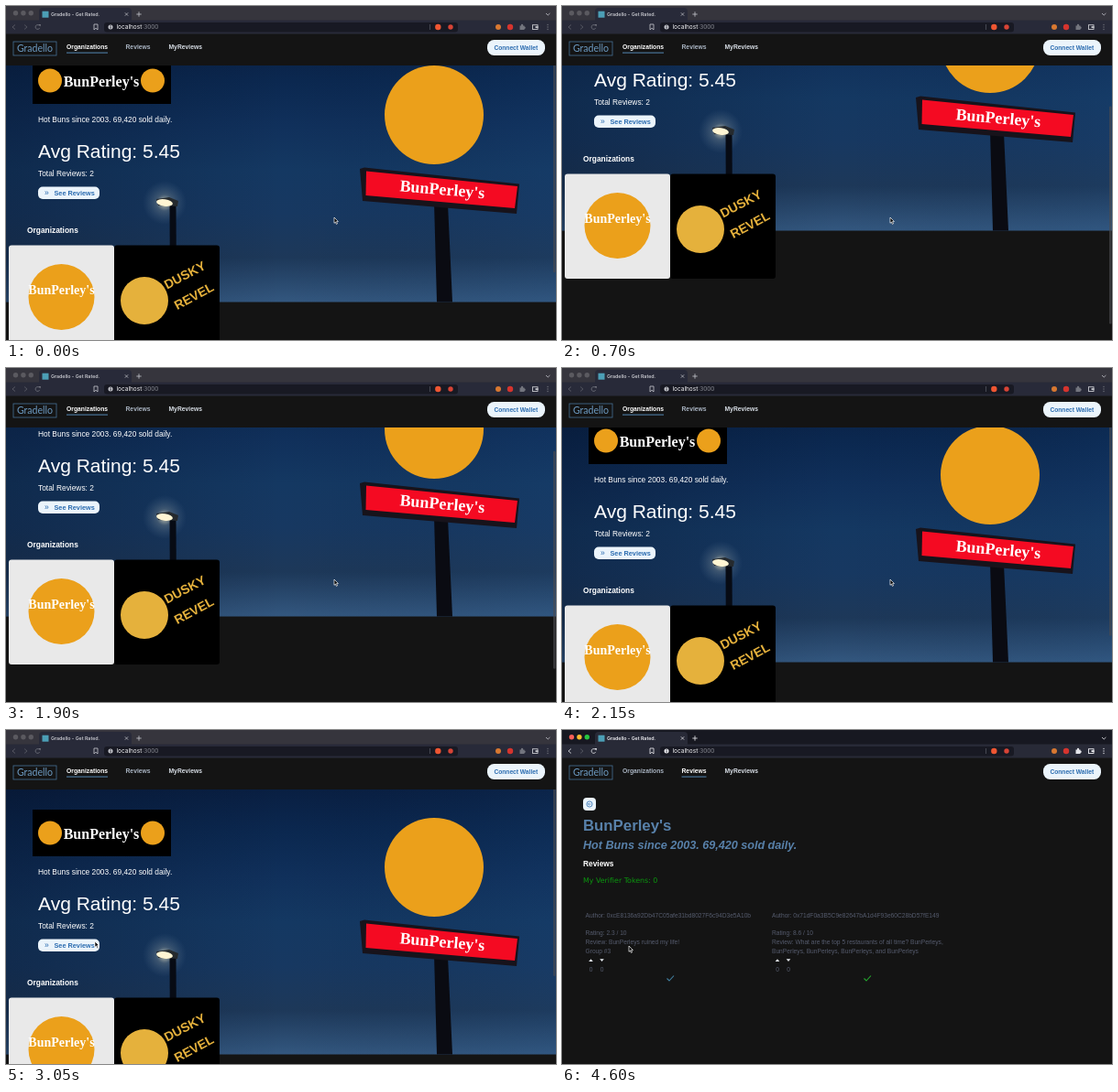
Animation of 600 by 365 pixels, one loop 5 s. Source, as an HTML page with a canvas:

```html
<!DOCTYPE html>
<html lang="en">
<head>
<meta charset="utf-8">
<title>Gradello - Get Rated.</title>
<style>
html, body { margin: 0; width: 100%; height: 100%; overflow: hidden; background: #141414; }
canvas { display: block; width: 600px; height: 365px; }
</style>
</head>
<body>
<canvas id="stage"></canvas>
<script>
const W = 600, H = 365, LOOP = 5000, STEP = 50;
const MAX_SCROLL = 124, ACTIVATE = 3600, NAVIGATE = 4300;
const SANS = '"Liberation Sans", Arial, sans-serif';
const SERIF = '"Liberation Serif", serif';
const UI = 'Inter, sans-serif';
const PAGE = '#141414', PALE = '#ebf4fb', LINK = '#2b6cb0', STEEL = '#5881aa', MUTED = '#555b6d';
const ORANGE = '#eba01b', GOLD = '#e5b13c';
const BRAND = "BunPerley's", MOTTO = 'Hot Buns since 2003. 69,420 sold daily.';

const canvas = document.getElementById('stage');
const c = canvas.getContext('2d');
const dpr = window.devicePixelRatio || 1;
canvas.width = W * dpr;
canvas.height = H * dpr;

const scrollKeys = [[0, 31], [150, 58], [350, 87], [700, 109], [1000, 121], [1300, 125.5], [1500, 125.5],
  [1700, 119], [1900, 83], [2150, 33], [2350, 10], [2550, 0]];
const cursorX = [[2550, 358], [2750, 260], [2900, 145], [3050, 97], [3350, 78], [3600, 76], [4300, 76], [4450, 73]];
const cursorY = [[2550, 231], [3050, 231], [3500, 235], [3600, 236]];

function track(keys, t) {
  if (t <= keys[0][0]) return keys[0][1];
  for (let i = 1; i < keys.length; i++) {
    const [t0, a] = keys[i - 1], [t1, b] = keys[i];
    if (t <= t1) return a + (b - a) * (t - t0) / (t1 - t0);
  }
  return keys[keys.length - 1][1];
}

// y is the middle of the capitals
function text(str, x, y, size, color, style = '', family = SANS, align = 'left') {
  c.font = `${style} ${size}px ${family}`;
  c.fillStyle = color;
  c.textAlign = align;
  c.fillText(str, x, y + size * 0.35);
}
function rect(x, y, w, h, color) {
  c.fillStyle = color;
  c.fillRect(x, y, w, h);
}
function round(x, y, w, h, r, color) {
  c.beginPath();
  c.roundRect(x, y, w, h, r);
  c.fillStyle = color;
  c.fill();
}
function disc(x, y, r, color) {
  c.beginPath();
  c.arc(x, y, r, 0, Math.PI * 2);
  c.fillStyle = color;
  c.fill();
}
function trace(points) {
  c.beginPath();
  for (let i = 0; i < points.length; i += 2) c.lineTo(points[i], points[i + 1]);
}
function poly(points, color) {
  trace(points);
  c.closePath();
  c.fillStyle = color;
  c.fill();
}
function line(points, color, width = 0.8) {
  trace(points);
  c.strokeStyle = color;
  c.lineWidth = width;
  c.stroke();
}
function rotated(x, y, angle, draw) {
  c.save();
  c.translate(x, y);
  c.rotate(angle);
  draw();
  c.restore();
}
function gradient(x0, y0, x1, y1, ...colors) {
  const g = c.createLinearGradient(x0, y0, x1, y1);
  colors.forEach((color, i) => g.addColorStop(i / (colors.length - 1), color));
  return g;
}

function drawBrowser(active) {
  const bar = active ? '#282a37' : '#282a39';
  const icon = active ? '#e4e5ea' : '#73757e';
  const label = active ? '#eeeef2' : '#c6c7cd';
  rect(0, 0, W, 16, active ? '#171821' : '#36353d');
  rect(0, 15.5, W, 15, bar);
  round(36, 2, 101, 16, [4, 4, 0, 0], bar);
  const lights = active ? ['#ff5f57', '#febc2e', '#28c840'] : ['#5b5a60', '#5b5a60', '#5b5a60'];
  lights.forEach((color, i) => disc(10.5 + i * 8.4, 7.8, 2.7, color));
  rect(39.5, 5.7, 7, 7, '#4c9fb6');
  text('Gradello - Get Rated.', 49, 9, 5.3, label, '600', UI);
  line([129.8, 7.3, 133.2, 10.7], label, 0.7);
  line([133.2, 7.3, 129.8, 10.7], label, 0.7);
  line([142.3, 9, 147.7, 9], label, 0.8);
  line([145, 6.3, 145, 11.7], label, 0.8);
  line([589, 8, 591.2, 10, 593.4, 8], label, 0.8);

  line([10, 20.5, 7, 23, 10, 25.5], active ? icon : '#62646e', 0.8);
  line([20, 20.5, 23, 23, 20, 25.5], '#5b5d68', 0.8);
  c.beginPath();
  c.arc(34.5, 23, 2.4, 0.4, 5.4);
  c.strokeStyle = icon;
  c.lineWidth = 0.8;
  c.stroke();
  poly([35.2, 20, 38, 20, 37.4, 22.6], icon);
  line([96, 20, 100, 20, 100, 26, 98, 24.2, 96, 26, 96, 20], label, 0.8);

  round(107, 18, 386, 10.5, 3, '#181923');
  disc(114, 23, 2.5, label);
  rect(113.6, 22.4, 0.9, 2.2, '#1c1d27');
  rect(113.6, 21, 0.9, 0.8, '#1c1d27');
  text('localhost', 120.5, 23, 6.5, '#f4f4f6', '', UI);
  c.font = `6.5px ${UI}`;
  text(':3000', 120.5 + c.measureText('localhost').width, 23, 6.5, '#85878f', '', UI);
  rect(462, 20, 0.6, 6, '#666873');
  disc(471.3, 23, 3.2, '#ef5632');
  disc(485, 23, 2.7, '#d84436');

  disc(537, 23, 3, '#d87831');
  disc(550, 23, 3.2, '#d5342e');
  rect(560.5, 21.5, 5, 4.5, icon);
  disc(563, 21, 1.2, icon);
  disc(565.5, 23.7, 1.2, icon);
  c.strokeStyle = label;
  c.lineWidth = 0.9;
  c.strokeRect(574.5, 20.7, 5.5, 4.8);
  rect(577.5, 22.2, 3, 1.8, label);
  [20.5, 23, 25.5].forEach(y => disc(591, y, 0.65, icon));
}

function drawHeader(onReviews, lift) {
  c.save();
  c.translate(0, -lift);
  rect(0, 30.5, W, 34.5, PAGE);
  c.strokeStyle = '#456f94';
  c.lineWidth = 0.8;
  c.strokeRect(8, 39, 47, 15);
  text('Gradello', 31.5, 46.5, 10.6, '#6d9cc4', '', 'Lato, sans-serif', 'center');
  text('Organizations', 66, 44.8, 6.75, onReviews ? '#a9b4c2' : '#fff', 'bold');
  text('Reviews', 130.5, 44.8, 6.75, onReviews ? '#fff' : '#a9b4c2', 'bold');
  text('MyReviews', 177.5, 44.8, 6.75, '#d8dee6', 'bold');
  if (onReviews) rect(130.5, 50.6, 27, 1, '#5387b4');
  else rect(66, 50.6, 45, 1, '#5387b4');
  round(525, 37, 63, 17, 7.5, PALE);
  text('Connect Wallet', 556.3, 45.3, 6.65, LINK, 'bold', SANS, 'center');
  c.restore();
}

function drawPhoto() {
  rect(0, 65, W, 289.5, gradient(0, 65, 0, 354,
    '#091f42', '#0b2850', '#10305b', '#143862', '#173861', '#1d3859', '#33577f'));
  rect(0, 65, W, 289.5, gradient(0, 0, W, 0, 'rgba(4,12,30,.3)', 'rgba(4,12,30,0)', 'rgba(30,80,135,.12)'));

  const glow = c.createRadialGradient(173, 246, 1, 173, 246, 24);
  glow.addColorStop(0, 'rgba(255,245,205,.75)');
  glow.addColorStop(0.35, 'rgba(190,195,185,.25)');
  glow.addColorStop(1, 'rgba(120,150,180,0)');
  disc(173, 246, 24, glow);
  poly([178.5, 249, 185.5, 247, 186, 354.5, 179, 354.5], '#070b14');
  poly([164, 242, 178, 240, 188, 244, 187, 250, 166, 249], '#252a2e');
  c.beginPath();
  c.ellipse(173, 246, 9, 3.8, 0.15, 0, Math.PI * 2);
  c.fillStyle = '#fff5d3';
  c.fill();

  poly([467, 245, 482, 248, 487, 354.5, 470, 354.5], '#0a0b12');
  disc(467, 150, 54, ORANGE);
  poly([386, 209, 391, 207.5, 560, 225.5, 557, 258, 389, 244], '#17131b');
  poly([393, 211.5, 558, 228, 555, 252, 392.5, 238], '#f40a22');
  rotated(476, 231, 0.085, () => text(BRAND, 0, 0, 18, '#fff', 'bold', SERIF, 'center'));
}

function drawCards() {
  round(3, 292.5, 115, 114.5, 3, '#e9e9e9');
  disc(60.5, 349, 36, ORANGE);
  text(BRAND, 60.5, 341, 14, '#fff', 'bold', SERIF, 'center');
  round(118, 292.5, 115, 114.5, 3, '#000');
  disc(151, 353, 26, GOLD);
  rotated(195, 325, -0.49, () => text('DUSKY', 0, 0, 14, GOLD, 'bold', SANS, 'center'));
  rotated(205, 348, -0.49, () => text('REVEL', 0, 0, 14, GOLD, 'bold', SANS, 'center'));
}

function drawHome(scroll, over) {
  c.save();
  c.beginPath();
  c.rect(0, 65 - over, W, H);
  c.clip();
  c.translate(0, -scroll);
  drawPhoto();
  rect(29, 87, 151, 51, '#000');
  disc(48, 112.5, 13, ORANGE);
  disc(160, 112.5, 13, ORANGE);
  text(BRAND, 104, 113, 16, '#fff', 'bold', SERIF, 'center');
  text(MOTTO, 35, 155, 8.37, '#fff');
  text('Avg Rating: 5.45', 35, 189.3, 21, '#fff');
  text('Total Reviews: 2', 35, 214.2, 8.37, '#fff');
  round(35, 228.5, 67, 13.5, 5, PALE);
  text('»', 42, 235, 8.5, LINK);
  text('See Reviews', 52.5, 235.7, 7.3, LINK, 'bold');
  text('Organizations', 23, 276.2, 8.4, '#fff', 'bold');
  drawCards();
  c.restore();

  round(597, 31 + Math.min(scroll, MAX_SCROLL) * 0.72, 2.5, 238, 1.2, 'rgba(75,75,80,.65)');
  if (over > 0) rect(0, H - over, W, over, '#fff');
}

function drawReview(x, author, rating, lines, checkX, checkColor) {
  text('Author: ' + author, x, 203, 6.65, MUTED);
  text(`Rating: ${rating} / 10`, x, 221.5, 6.65, MUTED);
  lines.forEach((str, i) => text(str, x, 231.5 + i * 10, 6.65, MUTED));
  const up = x + 6, down = x + 18;
  poly([up - 2.3, 253, up, 250.3, up + 2.3, 253], '#e8edf2');
  poly([down - 2.3, 250.3, down, 253, down + 2.3, 250.3], '#e8edf2');
  text('0', up, 261.5, 6.65, MUTED, '', SANS, 'center');
  text('0', down, 261.5, 6.65, MUTED, '', SANS, 'center');
  line([checkX - 3.5, 271.5, checkX - 1, 274, checkX + 4, 268.5], checkColor, 1.1);
}

function drawReviews() {
  round(23, 74, 14, 14, 4, PALE);
  c.beginPath();
  c.arc(30, 81, 3.1, 0, Math.PI * 2);
  c.strokeStyle = LINK;
  c.lineWidth = 0.8;
  c.stroke();
  line([31.7, 81, 28.4, 81], LINK, 0.7);
  line([29.8, 79.6, 28.4, 81, 29.8, 82.4], LINK, 0.7);
  text(BRAND, 23, 104, 16.8, STEEL, 'bold');
  text(MOTTO, 23, 125.5, 12.6, STEEL, 'italic bold');
  text('Reviews', 23, 146, 8.4, '#fff', 'bold');
  text('My Verifier Tokens: 0', 23, 164.5, 7.9, '#0b980f', '', '"DejaVu Sans", sans-serif');
  drawReview(25.5, '0xcE8136a92Db47C05afe31bd8027F6c94D3e5A10b', '2.3',
    ['Review: BunPerleys ruined my life!', 'Group #3'], 118, '#417f9f');
  drawReview(229, '0x71dF0a3B5C9e82647bA1d4F93e60C28bD57fE149', '8.6',
    ['Review: What are the top 5 restaurants of all time? BunPerleys,',
      'BunPerleys, BunPerleys, BunPerleys, and BunPerleys'], 333, '#25a72f');
}

function drawCursor(x, y, hand) {
  c.save();
  c.translate(x, y);
  if (hand) {
    trace([-0.8, 0, 0.6, 0, 0.8, 2.6, 3.4, 3.2, 3.6, 5, 2.8, 7.6, -0.8, 7.6, -3, 4.6, -2.2, 3.8, -0.9, 4.8]);
  } else {
    trace([0, 0, 0, 6.3, 1.4, 5, 2.4, 7.4, 3.5, 6.9, 2.5, 4.6, 4.4, 4.5]);
  }
  c.closePath();
  c.fillStyle = hand ? '#fff' : '#000';
  c.strokeStyle = hand ? '#111' : '#fff';
  c.lineWidth = 0.7;
  c.fill();
  c.stroke();
  c.restore();
}

function render(now) {
  const t = Math.floor((now % LOOP) / STEP) * STEP;
  const onReviews = t >= NAVIGATE;
  const scroll = track(scrollKeys, t);
  const over = onReviews ? 0 : Math.max(0, scroll - MAX_SCROLL);
  c.setTransform(dpr, 0, 0, dpr, 0, 0);
  rect(0, 0, W, H, PAGE);
  if (onReviews) drawReviews();
  else drawHome(scroll, over);
  drawHeader(onReviews, over);
  drawBrowser(t >= ACTIVATE);
  drawCursor(track(cursorX, t), track(cursorY, t), t >= 3300 && !onReviews);
}

const start = performance.now();
function frame() {
  render(performance.now() - start);
  requestAnimationFrame(frame);
}
frame();
</script>
</body>
</html>
```
